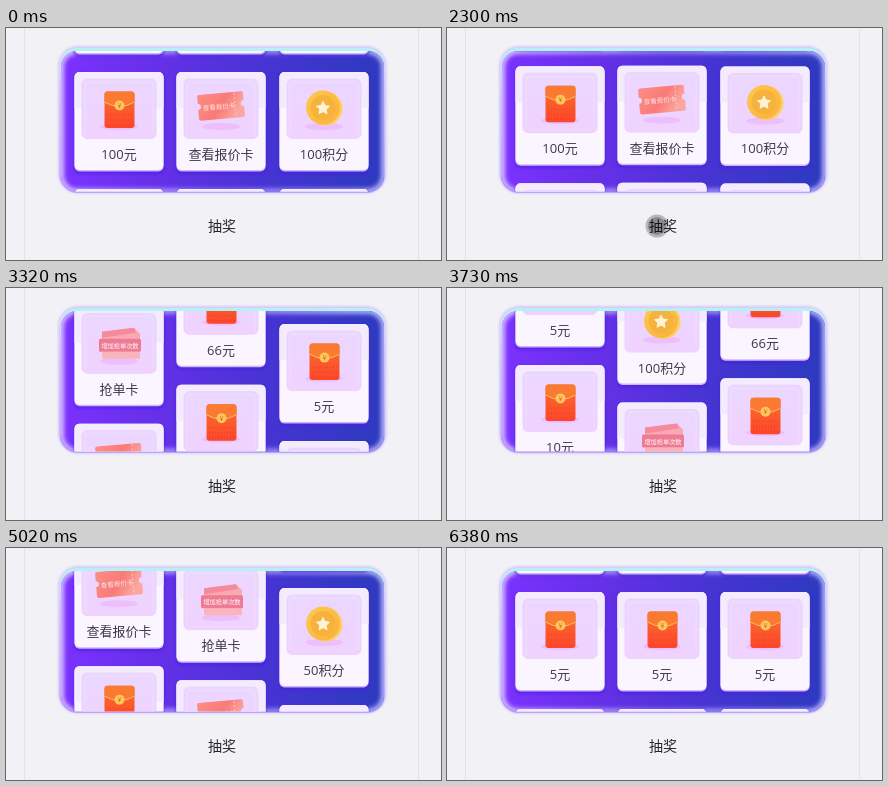
Write an HTML page that moves like this. It is 435 px wide and 232 px high and loops after 7.74 s.

```html
<!DOCTYPE html>
<html lang="zh">
<head>
<meta charset="utf-8">
<title>抽奖</title>
<style>
html, body { margin: 0; width: 100%; height: 100%; overflow: hidden; background: #f2f1f6; }
svg { display: block; width: 435px; height: 232px; }
text { font-family: "Open Sans", "Noto Sans CJK SC", "Noto Sans CJK", sans-serif; text-anchor: middle; fill: #3c3a42; }
.tiny { fill: #fff; }
</style>
</head>
<body>
<svg viewBox="0 0 435 232">
  <defs>
    <linearGradient id="drum">
      <stop offset="0" stop-color="#7b32ff"/><stop offset=".3" stop-color="#6530e8"/>
      <stop offset=".65" stop-color="#4534d2"/><stop offset="1" stop-color="#2d3abf"/>
    </linearGradient>
    <linearGradient id="rim" x2="0" y2="1">
      <stop offset="0" stop-color="#b4f3f1"/><stop offset=".1" stop-color="#c8e2fa"/>
      <stop offset=".3" stop-color="#cdc0fb"/><stop offset="1" stop-color="#b9a6fb"/>
    </linearGradient>
    <linearGradient id="glow">
      <stop offset="0" stop-color="#d9bcff"/><stop offset=".5" stop-color="#8f76f5"/><stop offset="1" stop-color="#b4b2fa"/>
    </linearGradient>
    <linearGradient id="panel" x2="0" y2="1">
      <stop offset="0" stop-color="#ebd7ff"/><stop offset="1" stop-color="#f0d2ff"/>
    </linearGradient>
    <linearGradient id="red" x2="0" y2="1">
      <stop offset="0" stop-color="#f9702c"/><stop offset="1" stop-color="#fd462c"/>
    </linearGradient>
    <linearGradient id="gold" x2="1" y2="1">
      <stop offset="0" stop-color="#ffc94e"/><stop offset="1" stop-color="#fbb03a"/>
    </linearGradient>
    <linearGradient id="coral" x2="1" y2=".4">
      <stop offset="0" stop-color="#fb8f84"/><stop offset=".6" stop-color="#f97a78"/><stop offset="1" stop-color="#fba79f"/>
    </linearGradient>
    <filter id="soft" x="-10%" y="-10%" width="120%" height="120%"><feGaussianBlur stdDeviation="2"/></filter>
    <filter id="faint" x="-10%" y="-10%" width="120%" height="120%"><feGaussianBlur stdDeviation=".9"/></filter>
    <clipPath id="window"><rect x="55" y="23" width="323" height="140.5" rx="16"/></clipPath>

    <!-- Card parts: origin at the middle of the card's top edge -->
    <g id="card">
      <rect x="-45.5" y="1" width="91" height="101" rx="6" fill="#4a1fe0" opacity=".55" filter="url(#faint)"/>
      <rect x="-44.5" y="1" width="89" height="98.5" rx="5" fill="#cdb6fb"/>
      <rect x="-44.5" width="89" height="98" rx="5" fill="#faf5ff"/>
      <path d="M-44.5 36V5a5 5 0 0 1 5-5h79a5 5 0 0 1 5 5v31z" fill="#f4ebff"/>
      <rect x="-37" y="7" width="74" height="59.5" rx="5" fill="url(#panel)" stroke="#e9cffb" stroke-width=".8"/>
      <path d="M-34 62V14a4 4 0 0 1 4-4h60a4 4 0 0 1 4 4v48" fill="none" stroke="#f3e2ff" stroke-width=".7"/>
      <ellipse cy="54.5" rx="19" ry="3.5" fill="#ebb9fc" opacity=".8"/>
    </g>
    <g id="envelope">
      <rect x="-14.5" y="19.5" width="30" height="36.5" rx="3" fill="url(#red)"/>
      <path d="M-14.5 30V22.500a3 3 0 0 1 3-3h24a3 3 0 0 1 3 3V30Q0 39-14.500 30z" fill="#f97a30"/>
      <path d="M-14.5 30Q.5 39 15.500 30" fill="none" stroke="#ffb95e"/>
      <path d="M-12 53h25M-12 48h25M-12 43h25" stroke="#e6361f" stroke-width=".8" stroke-dasharray="1 2"/>
      <circle cx=".5" cy="33.5" r="5" fill="#ffc65c"/>
      <text class="tiny" x=".5" y="36" style="font-size:7px;fill:#d9542a">¥</text>
    </g>
    <g id="coin">
      <circle cx="1.5" cy="36.5" r="17" fill="#fdcf62"/>
      <circle cx="-1" cy="35.5" r="17" fill="url(#gold)"/>
      <circle cx="-1" cy="35.5" r="12.5" fill="#f5b23c"/>
      <path d="M-1 29.500l2 4 4.500.7-3.300 3.100.8 4.500-4-2.200-4 2.200.8-4.500-3.300-3.100 4.500-.7z" fill="#fff3d6" stroke="#fff3d6" stroke-linejoin="round"/>
    </g>
    <g id="coupon" transform="rotate(-5 0 34)">
      <path d="M-21 21h42a2 2 0 0 1 2 2v7a3 3 0 0 0 0 6v9a2 2 0 0 1-2 2h-42a2 2 0 0 1-2-2v-9a3 3 0 0 0 0-6v-7a2 2 0 0 1 2-2z" fill="url(#coral)"/>
      <path d="M14 22v24" stroke="#ffd2cb" stroke-width=".8" stroke-dasharray="2 2"/>
      <text class="tiny" x="-2" y="37" style="font-size:6.5px" opacity=".8">查看报价卡</text>
    </g>
    <g id="ticket">
      <path d="M-17 25l32-4 6 6v24h-38z" fill="#f9a9b2"/>
      <path d="M-17 25l32-4 2 5-34 5z" fill="#f58a9c"/>
      <rect x="-20" y="32" width="42" height="13" rx="1.5" fill="#ee7b93"/>
      <path d="M-17 45h38v7h-38z" fill="#fab4bb"/>
      <text class="tiny" x="1" y="41" style="font-size:6.2px">增加抢单次数</text>
    </g>
  </defs>

  <path d="M18.5 0v232M412.5 0v232" stroke="#e3e2e9"/>
  <rect x="52" y="18" width="328.500" height="147.500" rx="20" fill="#d6c8fa" filter="url(#faint)"/>
  <rect x="53.5" y="20" width="325.500" height="145" rx="18" fill="url(#rim)"/>
  <g clip-path="url(#window)">
    <rect x="55" y="23" width="323" height="141" fill="url(#drum)"/>
    <rect x="55" y="23" width="323" height="140.5" rx="16" fill="none" stroke="url(#glow)" stroke-width="6" filter="url(#soft)"/>
    <g id="reels"></g>
  </g>
  <text x="216" y="203" font-size="14" style="fill:#26252b">抽奖</text>
  <g id="cursor">
    <circle r="11.5" fill="#000" fill-opacity=".24"/>
    <circle r="9" fill="#000" fill-opacity=".25"/>
  </g>
</svg>
<script>
const LOOP = 7740, SPIN = 2150, PITCH = 117, TOP = 44;
const prizes = [
  ["5元", "envelope"], ["10元", "envelope"], ["66元", "envelope"], ["100元", "envelope"],
  ["50积分", "coin"], ["100积分", "coin"], ["抢单卡", "ticket"], ["查看报价卡", "coupon"]
];
const reels = [
  { x: 113, from: 3, turns: 13, time: 3400 },
  { x: 215, from: 7, turns: 17, time: 3700 },
  { x: 318, from: 5, turns: 19, time: 4200 }
];
// time, x, y
const path = [
  [700, 188, 246], [1080, 191.5, 216], [1170, 192.5, 215], [1310, 192.5, 215],
  [1890, 210, 198], [2930, 210, 198], [3250, 206, 246]
];
const cursor = document.getElementById("cursor");
const count = prizes.length;
const clamp = v => Math.min(1, Math.max(0, v));

function cardMarkup(i) {
  const [label, icon] = prizes[(i + count) % count];
  return `<g transform="translate(0 ${i * PITCH})"><use href="#card"/><use href="#${icon}"/>` +
    `<text y="87" font-size="13">${label}</text></g>`;
}

const strip = Array.from({ length: count + 3 }, (_, i) => cardMarkup(i - 1)).join("");
const holder = document.getElementById("reels");
holder.innerHTML = reels.map(() => `<g>${strip}</g>`).join("");

// cubic-bezier(.42, 0, .58, 1)
function easeInOut(x) {
  let lo = 0, hi = 1;
  for (let i = 0; i < 24; i++) {
    const s = (lo + hi) / 2;
    if (1.26 * s - 0.78 * s * s + 0.52 * s ** 3 < x) lo = s; else hi = s;
  }
  return lo * lo * (3 - 2 * lo);
}

function cursorAt(t) {
  const next = path.findIndex(p => p[0] > t);
  if (next < 1) return [200, 260];
  const a = path[next - 1], b = path[next];
  const k = easeInOut((t - a[0]) / (b[0] - a[0]));
  return [a[1] + (b[1] - a[1]) * k, a[2] + (b[2] - a[2]) * k];
}

function draw(now) {
  const t = now % LOOP;
  reels.forEach((r, i) => {
    const turned = r.turns * easeInOut(clamp((t - SPIN) / r.time));
    const y = TOP - (r.from + turned) % count * PITCH;
    holder.children[i].setAttribute("transform", `translate(${r.x} ${y.toFixed(2)})`);
  });
  cursor.setAttribute("transform", `translate(${cursorAt(t)})`);
}

const start = performance.now();
function tick() {
  draw(performance.now() - start);
  requestAnimationFrame(tick);
}
tick();
</script>
</body>
</html>
```
